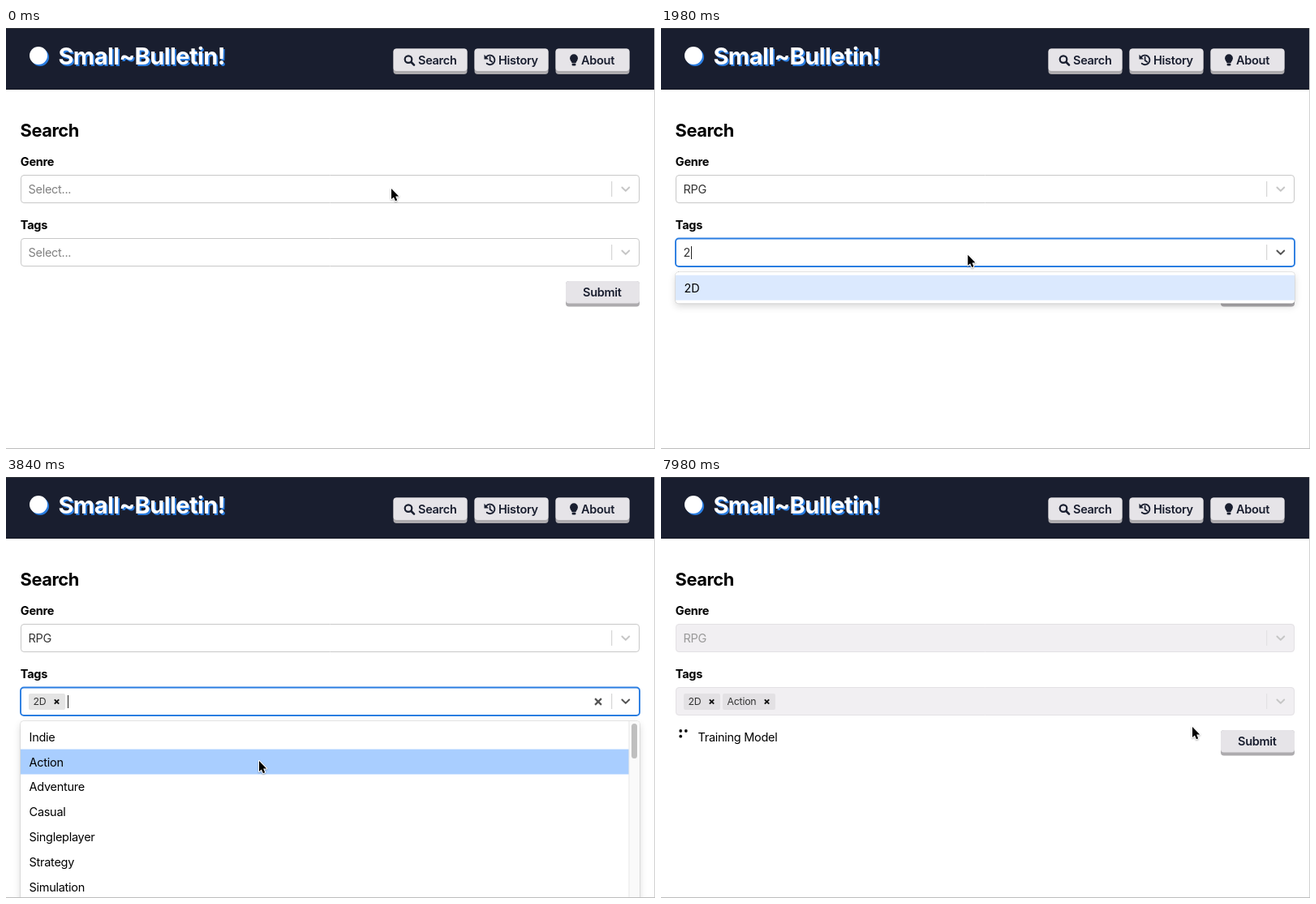
Animation, 800 px wide and 519 px high, one loop 8 s. Source, as an HTML page with a canvas:

```html
<!DOCTYPE html>
<html lang="en">
<head>
<meta charset="utf-8">
<title>Game search</title>
<style>
  html, body { margin: 0; width: 100%; height: 100%; overflow: hidden; background: #fff; }
  canvas { display: block; width: 800px; height: 519px; }
</style>
</head>
<body>
<canvas id="stage"></canvas>
<script>
const W = 800, H = 519, LOOP = 8000;
const canvas = document.getElementById('stage');
const ctx = canvas.getContext('2d');
const dpr = window.devicePixelRatio || 1;
canvas.width = W * dpr;
canvas.height = H * dpr;

const NAVY = '#191e2f', BLUE = '#2a7de1', FONT = 14.5, ROW = 30.9, PAD = 3.7;
const GENRES = ['Action', 'Strategy', 'RPG', 'Indie', 'Adventure', 'Sports',
  'Simulation', 'Early Access', 'Ex Early Access'];
const TAGS = ['Indie', 'Action', 'Adventure', 'Casual', 'Singleplayer', 'Strategy', 'Simulation'];

// Moments of the interaction, in ms
const T = {
  openGenre: 240, pressGenre: 960, pickGenre: 1020,
  openTags: 1500, type1: 1920, type2: 2160,
  press2D: 2550, pick2D: 2640, reopen: 3120,
  pressAction: 3800, pickAction: 3900,
  submit: 4610, load: 4680
};

// Pointer stops: time, x, y
const PATH = [
  [0, 475, 198], [300, 472, 200], [720, 460, 275], [900, 454, 302], [1040, 452, 303],
  [1380, 404, 278], [1560, 394, 277], [1920, 380, 279], [2520, 319, 306], [2640, 319, 306],
  [3000, 314, 279], [3180, 313, 279], [3600, 312, 350], [3920, 312, 350],
  [4500, 722, 326], [4640, 722, 326], [5400, 655, 308]
];

function pointer(t) {
  const i = PATH.findIndex(p => p[0] > t);
  if (i < 0) return PATH[PATH.length - 1].slice(1);
  const [t0, x0, y0] = PATH[i - 1], [t1, x1, y1] = PATH[i];
  const u = (t - t0) / (t1 - t0), e = u * u * (3 - 2 * u);
  return [x0 + (x1 - x0) * e, y0 + (y1 - y0) * e];
}

const within = (t, a, b) => t >= a && t < b;

function rect(x, y, w, h, color) {
  ctx.fillStyle = color;
  ctx.fillRect(x, y, w, h);
}

function round(x, y, w, h, r, fill, stroke, lw = 1) {
  ctx.beginPath();
  ctx.roundRect(x, y, w, h, r);
  if (fill) { ctx.fillStyle = fill; ctx.fill(); }
  if (stroke) { ctx.strokeStyle = stroke; ctx.lineWidth = lw; ctx.stroke(); }
}

function dot(x, y, r, color) {
  ctx.beginPath();
  ctx.arc(x, y, r, 0, Math.PI * 2);
  ctx.fillStyle = color;
  ctx.fill();
}

function line(points, color, lw, cap = 'butt') {
  ctx.beginPath();
  points.forEach(([x, y]) => ctx.lineTo(x, y));
  ctx.strokeStyle = color;
  ctx.lineWidth = lw;
  ctx.lineCap = cap;
  ctx.lineJoin = 'round';
  ctx.stroke();
}

function shape(points, color) {
  ctx.beginPath();
  points.forEach(([x, y]) => ctx.lineTo(x, y));
  ctx.closePath();
  ctx.fillStyle = color;
  ctx.fill();
}

// y is the middle of the capitals
function text(str, x, y, color = '#000', size = FONT, weight = 400) {
  ctx.font = `${weight} ${size}px Inter, "Noto Sans", sans-serif`;
  ctx.letterSpacing = `${-0.02 * size}px`;
  ctx.fillStyle = color;
  ctx.fillText(str, x, y + size * 0.36);
}

function cross(x, y, r, color, lw) {
  line([[x - r, y - r], [x + r, y + r]], color, lw);
  line([[x + r, y - r], [x - r, y + r]], color, lw);
}

function button(label, x, y, tx) {
  round(x, y, 91, 31.5, 4, '#adabae');
  round(x, y, 91, 27.5, 4, '#e6e4e8');
  text(label, tx, y + 14, NAVY, FONT, 600);
}

function searchIcon() {
  ctx.beginPath();
  ctx.arc(496, 38.6, 4.3, 0, Math.PI * 2);
  ctx.strokeStyle = NAVY;
  ctx.lineWidth = 2.2;
  ctx.stroke();
  line([[499.4, 42], [503, 45.6]], NAVY, 2.6, 'round');
}

function historyIcon() {
  ctx.beginPath();
  ctx.arc(596.6, 39.4, 5.8, -2.5, 2.3);
  ctx.strokeStyle = NAVY;
  ctx.lineWidth = 1.9;
  ctx.stroke();
  shape([[589.5, 32.8], [589.5, 38.4], [595, 38.4]], NAVY);
  line([[596.6, 35.8], [596.6, 40], [599.2, 41.8]], NAVY, 1.7, 'round');
}

function bulbIcon() {
  dot(700, 37.2, 4.9, NAVY);
  shape([[695.9, 39.6], [704.1, 39.6], [702.4, 43.2], [697.6, 43.2]], NAVY);
  round(697.6, 43.8, 4.8, 2.7, 1.2, NAVY);
}

function header() {
  rect(0, 0, W, 76, NAVY);
  rect(0, 0, W, 1, '#35373d');
  rect(0, 75, W, 1, '#11141f');
  dot(42, 36, 11, BLUE);
  dot(40, 34, 11, '#fff');
  const title = 'Small~Bulletin!';
  text(title, 66.2, 36.8, BLUE, 29, 700);
  text(title, 64.4, 35, '#fff', 29, 700);
  button('Search', 477.5, 25.5, 508);
  button('History', 577.5, 25.5, 607);
  button('About', 677.5, 25.5, 709);
  searchIcon();
  historyIcon();
  bulbIcon();
}

// One select field; top is its upper edge
function control(top, { focus, hover, off }) {
  const mid = top + 17.5;
  if (focus) round(18, top + 0.5, 763, 34.5, 4, '#fff', BLUE, 1.9);
  else round(18.5, top + 0.5, 762, 34, 3.6, off ? '#f1eff2' : '#fff',
    off ? '#e3e1e4' : hover ? '#acacac' : '#c8c8c8');
  rect(746.2, top + 8, 1, 19, off ? '#e0dee1' : '#cccccc');
  line([[759.4, mid - 2], [763.8, mid + 2.4], [768.2, mid - 2]],
    focus ? '#555' : '#c6c6c6', 2, 'round');
}

function chip(label, x, w, off) {
  round(x, 267, w, 20, 2, off ? '#e3e1e4' : '#e4e4e4');
  text(label, x + 5.6, 277, '#333', 12.3);
  cross(x + w - 10.5, 277, 2.7, '#111', 1.9);
}

function menu(top, items, my, pressed, height, thumb) {
  const bar = thumb > 0;
  ctx.save();
  ctx.shadowColor = 'rgba(0,0,0,.16)';
  ctx.shadowBlur = 10 * dpr;
  ctx.shadowOffsetY = 3.6 * dpr;
  round(18, top, 763, height, 3.6, '#fff');
  ctx.restore();
  round(17.6, top - 0.4, 763.8, height + 0.8, 4, null, 'rgba(0,0,0,.1)', 0.9);

  ctx.save();
  ctx.beginPath();
  ctx.roundRect(18, top, 763, height, 3.6);
  ctx.clip();
  const over = Math.floor((my - top - PAD) / ROW);
  const active = Math.max(0, Math.min(items.length - 1, over));
  items.forEach((item, i) => {
    const y = top + PAD + i * ROW;
    if (i === active) rect(18, y, bar ? 750 : 763, ROW, pressed ? '#a9ceff' : '#dbe9fe');
    text(item, 28.6, y + ROW / 2 + 0.3);
  });
  if (bar) {
    rect(768, top, 13, height, '#fafafa');
    rect(767.5, top, 1, height, '#e8e8e8');
    round(771, top + 3, 7, thumb, 3.5, '#bfbfbf');
  }
  ctx.restore();
}

// Braille spinner: bits 0-2 are the left column, 3-5 the right one
const SPIN = [...'⠋⠙⠹⠸⠼⠴⠦⠧⠇⠏'].map(c => c.charCodeAt(0) - 0x2800);
function spinner(t) {
  const step = Math.floor((t - 6000) / 61.5 + 8.1 + 100);
  const bits = SPIN[step % 10];
  for (let i = 0; i < 6; i++) {
    if (bits >> i & 1) dot(24.2 + (i > 2 ? 6.6 : 0), 313 + (i % 3) * 6.7, 1.9, '#111');
  }
}

function arrow(x, y) {
  const pts = [[0, 0], [0, 13], [2.9, 10.4], [5, 15.2], [7.2, 14.2], [5.2, 9.6], [9.2, 9.4]]
    .map(([a, b]) => [x + a, y + b]);
  ctx.save();
  ctx.shadowColor = 'rgba(0,0,0,.3)';
  ctx.shadowBlur = 2 * dpr;
  ctx.shadowOffsetY = dpr;
  line([...pts, pts[0]], '#fff', 2, 'round');
  ctx.restore();
  shape(pts, '#000');
}

function draw(t) {
  ctx.setTransform(dpr, 0, 0, dpr, 0, 0);
  const [mx, my] = pointer(t);
  const off = t >= T.load;
  const tagFocus = within(t, T.openTags, T.submit);
  const hovers = top => t > 60 && mx > 18 && mx < 781 && my > top && my < top + 35;

  rect(0, 0, W, H, '#fff');
  header();
  text('Search', 17.6, 126, '#000', 21.8, 700);
  text('Genre', 17.8, 164.5, '#000', FONT, 700);
  text('Tags', 17.8, 242.5, '#000', FONT, 700);
  button('Submit', 690, 312, 711);

  control(181, { focus: within(t, T.openGenre, T.openTags), hover: hovers(181), off });
  if (t < T.pickGenre) text('Select...', 27.5, 199, '#808080');
  else text('RPG', 27.5, 199, off ? '#999' : '#333');

  control(259, { focus: tagFocus, hover: hovers(259), off });
  if (t < T.type1) text('Select...', 27.5, 277, '#808080');
  else if (t < T.pick2D) text(t < T.type2 ? '2' : '2d', 27.5, 277, '#333');
  let caret = t < T.type1 ? 28 : t < T.type2 ? 37 : 46;
  if (t >= T.pick2D) {
    chip('2D', 28, 45, off);
    caret = 76;
    if (!off) cross(730, 277, 3.9, tagFocus ? '#555' : '#c6c6c6', 2.2);
  }
  if (t >= T.pickAction) {
    chip('Action', 76, 65, off);
    caret = 144;
  }
  if (tagFocus && (t + 270) % 1000 < 500) rect(caret, 269, 1, 16, '#222');

  if (within(t, T.openGenre, T.pickGenre)) {
    menu(223, GENRES, my, t >= T.pressGenre, 272.5, 208);
  } else if (within(t, T.openTags, T.type1)) {
    menu(301, TAGS, my, false, 272.5, 43);
  } else if (within(t, T.type1, T.pick2D)) {
    menu(301, ['2D'], my, t >= T.press2D, 38.4, 0);
  } else if (within(t, T.reopen, T.pickAction)) {
    menu(301, TAGS, my, t >= T.pressAction, 272.5, 43);
  }

  if (off) {
    spinner(t);
    text('Training Model', 45.6, 320.8);
  }
  rect(799, 0, 1, H, '#d2d2d2');
  rect(0, 518, W, 1, '#bdbdbd');
  arrow(mx, my);
}

const start = performance.now();
function tick() {
  draw((performance.now() - start) % LOOP);
  requestAnimationFrame(tick);
}
tick();
</script>
</body>
</html>
```
